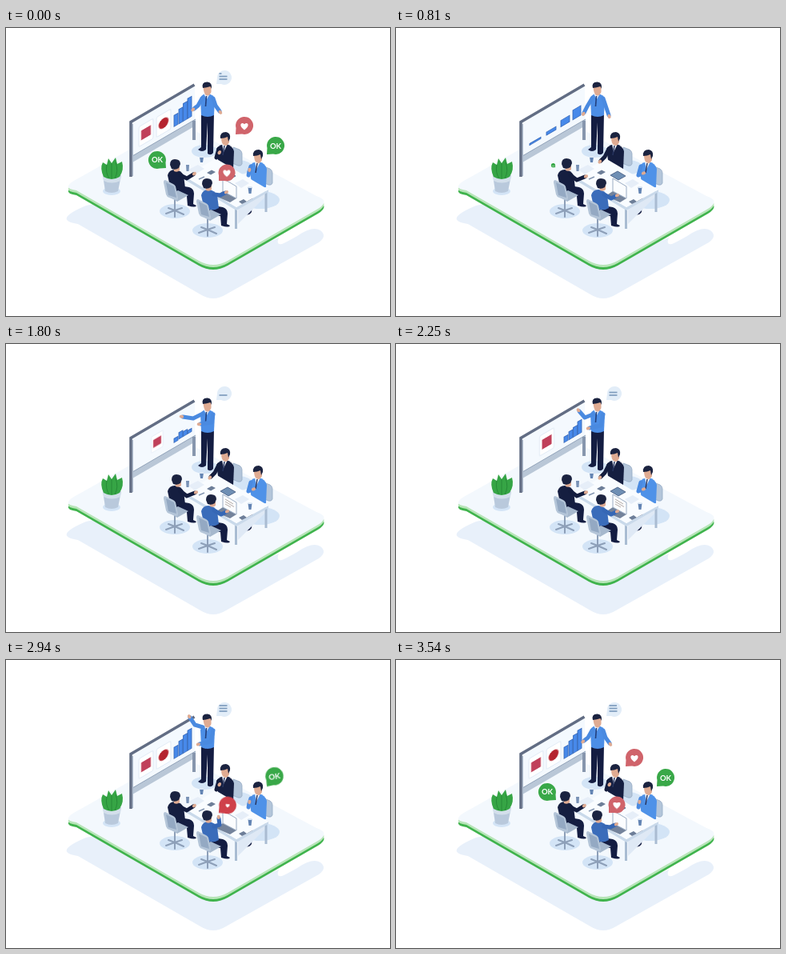
Animation, 480 px wide and 360 px high, one loop 3.57 s. Source, as an HTML page:

```html
<!DOCTYPE html>
<html lang="en">
<head>
<meta charset="utf-8">
<title>Team meeting</title>
<style>
html, body { margin: 0; width: 100%; height: 100%; overflow: hidden; background: #fff; }
svg { display: block; width: 480px; height: 360px; }
.a { animation: 3570ms ease-in-out infinite; }
.arm { fill: none; stroke-width: 5; stroke-linejoin: round; stroke-linecap: round; marker-end: url(#hand); }
.navy { stroke: #141d3e; }
.blue { stroke: #4a8ae0; }
.deep { stroke: #3667b5; }
.skin { fill: #dfab92; }
.hair { fill: #1b2340; }
.pants { fill: #141d42; }
.glow { fill: #d3e4f6; }
.steel { fill: none; stroke: #8d9fb8; stroke-width: 2; stroke-linecap: round; }
.bar { fill: #4789ea; stroke: #3465b5; stroke-width: .8; }
.card { fill: #fff; stroke: #e1eaf5; }
.pop { transform-box: view-box; }
text { font: 700 9.5px Lato, "Open Sans", sans-serif; fill: #fff; text-anchor: middle; }

/* presenter */
#point { animation-name: point; }
@keyframes point {
  0%, 7%, 94%, 100% { d: path("M245 88L240 97L235 101"); }
  18%, 25% { d: path("M245 88L239 98L235 106"); }
  33%, 38% { d: path("M245 90L238 95L229 93"); }
  47%, 53% { d: path("M246 87L234 93L221 91"); }
  62%, 66% { d: path("M246 88L236 92L229 84"); }
  76%, 86% { d: path("M246 84L236 81L230 72"); }
}
#rest { animation-name: rest; }
@keyframes rest {
  0%, 7%, 94%, 100% { d: path("M259 88L262 97L267 104"); }
  18%, 25% { d: path("M259 88L263 100L266 109"); }
  33%, 38% { d: path("M259 88L262 102L264 100"); }
  47%, 53% { d: path("M259 88L257 98L243 100"); }
  62%, 86% { d: path("M259 88L256 102L242 105"); }
}
#talk { animation-name: talk; }
@keyframes talk {
  0%, 6% { opacity: 1; transform: none; }
  14%, 31% { opacity: 0; transform: translateY(14px) scale(.8); }
  35.3% { opacity: .85; transform: translateY(8px) scale(.92); }
  41% { opacity: 1; transform: translateY(-3px); }
  45%, 100% { opacity: 1; transform: none; }
}
#l1 { animation-name: l1; }
#l2 { animation-name: l2; }
#l3 { animation-name: l3; }
@keyframes l1 { 0%, 6% { stroke-dashoffset: 0; } 12%, 45% { stroke-dashoffset: 10; } 49%, 100% { stroke-dashoffset: 0; } }
@keyframes l2 { 0%, 6% { stroke-dashoffset: 0; } 12%, 55% { stroke-dashoffset: 10; } 61%, 100% { stroke-dashoffset: 0; } }
@keyframes l3 { 0% { stroke-dashoffset: 7; } 6%, 67% { stroke-dashoffset: 10; } 74%, 99% { stroke-dashoffset: 0; } 100% { stroke-dashoffset: 7; } }

/* board */
#b1 { animation-name: b1; }
#b2 { animation-name: b2; }
#b3 { animation-name: b3; }
#b4 { animation-name: b4; }
@keyframes b1 {
  0%, 10%, 76%, 100% { x: 54px; y: 24px; width: 5px; height: 14px; }
  22.7% { x: 11px; y: 34px; width: 14px; height: 2px; }
  35.3%, 40% { x: 9px; y: 31px; width: 14px; height: 5px; }
  50.4% { x: 54px; y: 33px; width: 5px; height: 5px; }
  63% { x: 54px; y: 31px; width: 5px; height: 7px; }
}
@keyframes b2 {
  0%, 10%, 76%, 100% { x: 60px; y: 20px; width: 5px; height: 18px; }
  22.7% { x: 32px; y: 32px; width: 12px; height: 4px; }
  35.3%, 40% { x: 26px; y: 25px; width: 14px; height: 12px; }
  50.4% { x: 60px; y: 29px; width: 5px; height: 8px; }
  63% { x: 60px; y: 28px; width: 5px; height: 10px; }
}
@keyframes b3 {
  0%, 10%, 76%, 100% { x: 65.5px; y: 16px; width: 5px; height: 22px; }
  22.7% { x: 50px; y: 28px; width: 11px; height: 8px; }
  35.3%, 40% { x: 44px; y: 27px; width: 13px; height: 10px; }
  50.4% { x: 65.5px; y: 31px; width: 5px; height: 6px; }
  63% { x: 65.5px; y: 26px; width: 5px; height: 12px; }
}
@keyframes b4 {
  0%, 10%, 76%, 100% { x: 71px; y: 13px; width: 5px; height: 25px; }
  22.7% { x: 65px; y: 24px; width: 10px; height: 12px; }
  35.3%, 40% { x: 61px; y: 31px; width: 14px; height: 6px; }
  50.4% { x: 71px; y: 33px; width: 5px; height: 4px; }
  63% { x: 71px; y: 22px; width: 5px; height: 16px; }
}
#c1 { animation-name: c1; }
#c2 { animation-name: c2; }
@keyframes c1 {
  0%, 9% { transform: translate(19px, 25px) scale(1); }
  17% { transform: translate(19px, 25px) scale(0); }
  18%, 45% { transform: translate(33px, 24.5px) scale(0); }
  50.4% { transform: translate(33px, 24.5px) scale(.82); }
  56%, 64% { transform: translate(32.5px, 24.5px) scale(1); }
  75%, 100% { transform: translate(19px, 25px) scale(1); }
}
@keyframes c2 {
  0%, 9%, 78%, 100% { transform: translate(41px, 26px) scale(1); }
  17%, 70% { transform: translate(41px, 26px) scale(0); }
}

/* seated team */
#armA { animation-name: armA; }
#armB { animation-name: armB; }
#armC { animation-name: armC; }
#armD { animation-name: armD; }
@keyframes armA {
  0%, 10%, 80%, 100% { d: path("M218 184L226 188L234 183"); }
  21%, 69% { d: path("M218 184L226 190L236 186"); }
}
@keyframes armB {
  0%, 10%, 92%, 100% { d: path("M260 208L268 209L274 206"); }
  21%, 71% { d: path("M260 208L269 213L275 210"); }
  79%, 85% { d: path("M260 208L267 206L266 198"); }
}
@keyframes armC {
  0%, 10%, 80%, 100% { d: path("M266 151L263 162L266 157"); }
  21%, 69% { d: path("M266 151L261 161L256 166"); }
}
@keyframes armD {
  0%, 10%, 80%, 100% { d: path("M306 173L303 184L304 179"); }
  21%, 69% { d: path("M306 173L303 184L308 182"); }
}
#headA { animation-name: headA; }
#headB { animation-name: headB; }
@keyframes headA { 0%, 10%, 80%, 100% { transform: translate(-1px, 1px); } 21%, 69% { transform: translate(1px, 0); } }
@keyframes headB { 0%, 10%, 80%, 100% { transform: translate(-3px, 0); } 21%, 69% { transform: translate(2px, 0); } }
#lines { animation-name: lines; }
@keyframes lines { 0%, 40%, 70%, 100% { opacity: 0; } 48%, 64% { opacity: 1; } }

/* reactions */
#okL { transform-origin: 199px 174px; animation-name: okL; }
#okR { transform-origin: 327px 157px; animation-name: okR; }
#likeT { transform-origin: 288px 132px; animation-name: likeT; }
#likeB { transform-origin: 267px 190px; animation-name: likeB; }
@keyframes okL {
  0%, 15%, 93%, 100% { transform: none; }
  22.7% { transform: scale(.25); }
  24%, 84% { transform: scale(0); }
  90% { transform: scale(1.08) rotate(-6deg); }
}
@keyframes okR {
  0%, 12%, 87%, 100% { transform: none; }
  19%, 76% { transform: scale(0); }
  82.4% { transform: scale(1.02) rotate(-9deg); }
}
@keyframes likeT {
  0%, 12%, 93%, 100% { transform: none; }
  19%, 85% { transform: scale(0); }
  90% { transform: scale(1.08) rotate(-6deg); }
}
@keyframes likeB {
  0%, 12%, 87%, 100% { transform: none; }
  19%, 77% { transform: scale(0); }
  82.4% { transform: scale(1.03) rotate(5deg); }
}
.red { fill: #d0646b; animation-name: red; }
@keyframes red { 0%, 10%, 94%, 100% { fill: #d0646b; } 20%, 84% { fill: #cf404a; } }
#beat { animation-name: beat; }
@keyframes beat { 0%, 20%, 89%, 100% { transform: scale(1); } 21%, 78% { transform: scale(0); } 82.4% { transform: scale(.5); } }
</style>
</head>
<body>
<svg viewBox="0 0 480 360">
  <defs>
    <marker id="hand" markerUnits="userSpaceOnUse" markerWidth="8" markerHeight="8" viewBox="-4 -4 8 8" refX="-1.6" orient="auto" overflow="visible">
      <ellipse class="skin" rx="2.7" ry="2"/>
    </marker>
    <path id="slab" d="M92 187Q66 200 88 203L241 291Q259 301 277 291L390 226Q406 216 388 210L237 129Q217 118 197 128Z"/>
    <g id="chair">
      <g class="steel">
        <path d="M211 214V229M211 228L200 232M211 228L222 233M211 228V236M211 228L203 225M211 228L220 225"/>
      </g>
      <path d="M201 209L215 203L228 209L214 217Z" fill="#a6b8cd"/>
      <path d="M199 190Q197 190 197 193L200 208Q201 211 204 212L212 215Q215 216 215 212L212 198Q211 196 209 195Z" fill="#b4c5d8"/>
      <path d="M200 193L210 198L213 212L203 209Z" fill="#94a9c3"/>
    </g>
    <g id="back">
      <path class="pants" d="M211 196L229 199Q235 201 235 207L234 220L238 222Q237 225 227 222L226 210L211 210Z"/>
      <path d="M202 184Q204 177 211 177Q219 178 222 184L224 200Q214 206 205 198Z" fill="currentColor"/>
    </g>
    <g id="backHead">
      <path class="skin" d="M210 172H218V177Q215 180 211 178Z"/>
      <path class="hair" d="M206 170Q206 163 212 163Q219 163 219 169L217 174Q213 177 208 175Z"/>
    </g>
    <g id="front">
      <path d="M263 151Q267 145 275 145Q283 147 285 154L284 177Q274 179 266 172Z" fill="currentColor"/>
      <path d="M270 145H277L272 155Z" fill="#f2f6fb"/>
      <path d="M273 147L271 159" stroke="#26345f" stroke-width="1.5"/>
      <path class="skin" d="M269 136Q274 132 279 136V143Q276 149 272 146Q269 144 269 136Z"/>
      <path class="hair" d="M268 138Q267 130 275 130Q281 131 280 138L278 142L277 136Q273 138 268 138Z"/>
    </g>
    <path id="seat" d="M284 149L292 152Q295 154 295 157V170Q294 173 290 172L283 169Z" fill="#b3c5da" stroke="#96abc4" stroke-width=".8"/>
    <path id="heart" d="M0 4.6C-8 -1 -4 -6.2 0 -2.8C4 -6.2 8 -1 0 4.6Z" fill="#fff"/>
  </defs>

  <!-- floor -->
  <path fill="#e8f0fa" d="M100 222Q57 240 90 245L243 333Q259 343 275 333L391 268Q402 260 393 253Q383 247 364 260Q350 268 345 270Q337 272 341 262L260 296L118 218Z"/>
  <use href="#slab" y="6" fill="#3fb34c"/>
  <use href="#slab" y="3" fill="#b7e5b8"/>
  <use href="#slab" fill="#f3f8fd"/>
  <g class="glow">
    <ellipse cx="248" cy="154" rx="16" ry="8"/>
    <ellipse cx="211" cy="229" rx="19" ry="9"/>
    <ellipse cx="252" cy="253" rx="19" ry="9"/>
    <ellipse cx="318" cy="215" rx="24" ry="11"/>
    <ellipse cx="291" cy="174" rx="17" ry="9"/>
    <ellipse cx="132" cy="204" rx="11" ry="5"/>
  </g>

  <!-- plant -->
  <path d="M121 184L124 204Q132 208 140 204L144 184Z" fill="#b9c9dc"/>
  <path d="M121 184Q132 192 144 184L143 191Q132 196 122 191Z" fill="#d3dfeb"/>
  <path d="M122 186Q117 175 121 168L126 171L128 163L132 169L137 162L139 170L145 167Q148 177 142 186Q132 192 122 186Z" fill="#36a545"/>
  <path d="M126 171Q124 181 129 188M137 168Q141 179 136 188M132 169V188" fill="none" stroke="#278a38"/>

  <!-- board -->
  <path d="M157 118L236 71V117L157 163Z" fill="#f4f9fe"/>
  <path d="M158 160L237 114V122L158 168Z" fill="#b9c7d7"/>
  <path d="M158 160L237 114" stroke="#93a4ba"/>
  <path d="M235 116V140" stroke="#8796ad" stroke-width="4"/>
  <path d="M235.500 71L156 117.500V186" fill="none" stroke="#626d84" stroke-width="3.500"/>
  <path d="M158.500 120V185" stroke="#a9b7ca"/>
  <g transform="matrix(1 -.5875 0 1 156 117)">
    <g id="c1" class="a">
      <rect class="card" x="-9" y="-12.500" width="18" height="25" rx="2"/>
      <rect x="-6" y="-6" width="12" height="12" fill="#c0405a"/>
    </g>
    <g id="c2" class="a">
      <rect class="card" x="-9" y="-12.500" width="18" height="25" rx="2"/>
      <circle r="6.200" fill="#b5242f"/>
    </g>
    <rect id="b1" class="bar a"/>
    <rect id="b2" class="bar a"/>
    <rect id="b3" class="bar a"/>
    <rect id="b4" class="bar a"/>
  </g>

  <!-- presenter -->
  <path class="pants" d="M244 106H260L259 156Q256 160 252 157L252 118L250 152Q245 156 240 152L244 149Z"/>
  <path d="M243 87Q246 82 251 82Q260 83 261 89L260 109Q252 113 244 109Z" fill="#4c8ee6"/>
  <path d="M247 82H255L251 89Z" fill="#eaf2fc"/>
  <path d="M250.500 85L249.500 98" stroke="#23407d" stroke-width="1.600"/>
  <path class="skin" d="M246.500 73Q251 70 256.500 73V80Q254 86 250 84Q247 82 246.500 73Z"/>
  <path class="hair" d="M246 75Q244 67 252 67.500Q258 68 257 76L255.500 73Q251 74.500 246 75Z"/>
  <path id="point" class="arm blue a" d="M245 88L240 97L235 101"/>
  <path id="rest" class="arm blue a" d="M259 88L262 97L267 104"/>
  <g id="talk" class="pop a" style="transform-origin:271px 61px">
    <path d="M263 70L264 62A9 9 0 1 1 269 70Z" fill="#e2edf8"/>
    <g stroke="#7f9cbd" stroke-width="1.700" stroke-dasharray="10">
      <path id="l3" class="a" d="M266.500 57H276.500"/>
      <path id="l2" class="a" d="M266.500 60.500H276.500"/>
      <path id="l1" class="a" d="M266.500 64H276.500"/>
    </g>
  </g>

  <!-- far side -->
  <use href="#seat"/>
  <use href="#seat" x="38" y="24"/>
  <use href="#front" color="#151e40"/>
  <path class="pants" d="M303 202L309 203L307 230Q304 235 297 233L300 227Z"/>
  <use href="#front" x="41" y="22" color="#4f92e8"/>

  <!-- table -->
  <path d="M290 225L325 206V210L290 245Z" fill="#dfe9f5"/>
  <path d="M287.500 224V251M325 204V230" stroke="#a9bcd2" stroke-width="3"/>
  <path d="M224 186L288 224L328 202V205L288 228L224 190Z" fill="#c9d9ea"/>
  <path d="M224 186L262 163L328 202L288 224Z" fill="#f9fcff"/>
  <path d="M228 177L240 171L248 176L236 183ZM286 194L296 189L304 194L294 200Z" fill="#e6eef8"/>
  <path d="M268 184L277 179L287 185L278 190Z" fill="#6f8fb4" stroke="#40577e" stroke-width=".8"/>
  <path d="M251 181L257 177.500L262 180L256 183.500ZM291 217L297 214L301 217L295 220Z" fill="#6d7e98"/>
  <path d="M241 189L248 186" stroke="#8698b2" stroke-width="1.500"/>
  <path d="M242 161H247L246 168H243ZM302.500 199H307.500L306.500 207H303.500Z" fill="#6384b3"/>
  <path d="M242 161H247M302.500 199H307.500" stroke="#dce8f5" stroke-width="2"/>
  <path d="M225 171H229L228.500 179H225.500Z" fill="#7891b5"/>
  <path d="M262 210L271 204L288 213L280 218Z" fill="#74839b"/>
  <path d="M271 188L288 198V213L271 204Z" fill="#fbfdff" stroke="#9bacc3"/>
  <path id="lines" class="a" d="M274 194L284 200M274 197L285 203.500M274 200L281 204" stroke="#b5a9a4"/>
  <path id="armC" class="arm navy a" d="M266 151L263 162L266 157"/>
  <path id="armD" class="arm blue a" d="M306 173L303 184L304 179"/>

  <!-- near side -->
  <use href="#back" color="#151e40"/>
  <g id="headA" class="a"><use href="#backHead"/></g>
  <path id="armA" class="arm navy a" d="M218 184L226 188L234 183"/>
  <use href="#chair"/>
  <use href="#back" x="42" y="25" color="#3a6cba"/>
  <g id="headB" class="a"><use href="#backHead" x="42" y="25"/></g>
  <path id="armB" class="arm deep a" d="M260 208L268 209L274 206"/>
  <use href="#chair" x="41" y="24"/>

  <!-- reactions -->
  <g id="okL" class="pop a">
    <path d="M200 175L192 175.500A11 11 0 1 1 199.500 168Z" fill="#39a848"/>
    <text x="189" y="168.400">OK</text>
  </g>
  <g id="okR" class="pop a">
    <path d="M326 158L326.500 150A11 11 0 1 1 334 157.500Z" fill="#39a848"/>
    <text x="337" y="150.800">OK</text>
  </g>
  <g id="likeT" class="pop a">
    <path class="red a" d="M287 133L287.500 125A11 11 0 1 1 295 132.500Z"/>
    <use href="#heart" x="298" y="123"/>
  </g>
  <g id="likeB" class="pop a">
    <path class="red a" d="M266 191L266 184A10.500 10.500 0 1 1 273 191Z"/>
    <g transform="translate(276 181.500)"><g id="beat" class="a"><use href="#heart"/></g></g>
  </g>
</svg>
</body>
</html>
```
